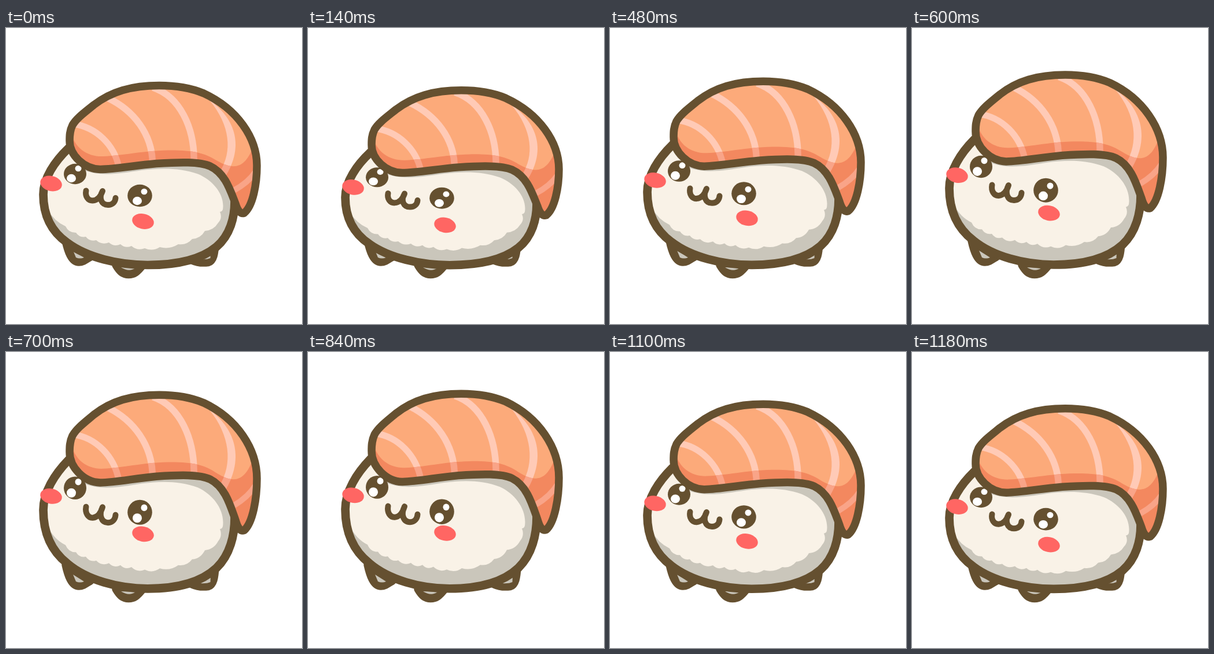
These frames come from a looping animation (512 by 512 pixels, 1200 ms). An HTML page with a canvas:

```html
<!DOCTYPE html>
<html lang="en">
<head>
<meta charset="utf-8">
<title>Breathing sushi</title>
<style>
  html, body { margin: 0; width: 100%; height: 100%; overflow: hidden; background: #fff; }
  canvas { display: block; width: 100vw; height: 100vh; object-fit: contain; }
</style>
</head>
<body>
<canvas id="stage" width="512" height="512"></canvas>
<script>
const ctx = document.getElementById('stage').getContext('2d');
const LOOP = 1200, STEP = 20;

const ink = '#655030', rice = '#f9f2e7', riceShade = '#cac6bb',
      fish = '#fcaa7a', fishShade = '#f3885f',
      fat = '#ffcab6', fatShade = '#f9a488', blush = '#ff6663';

const feet = [
  ['M103 368 C107 386 113 405 126 405 C133 405 138 401 146 396', 'M116 385 L121 397 Q128 400 135 397 Z'],
  ['M190 410 C197 422 203 426.500 212 426.500 C222 426.500 227 422 236 411', 'M199 414 L224 415 Q213 423 199 414 Z'],
  ['M322 402 C333 407 343 406.500 350 405.500 C359 403 361 390 362 372', 'M336 400 L354 387 L353.500 398 Q347 401 336 400 Z']
];

const body = 'M108 208 C84 231 64.500 260 64.500 288 C64.500 330 84 356 106 371.500 C140 397 195 410 245 410 ' +
  'C300 410 338 400 364 378.500 C388 358 395.500 327 395.500 300 C396 250 340 190 250 190 C190 190 130 190 108 208 Z';

const salmon = 'M412 320 C427 308 434 270 434 238 C434 190 400 140 342 113 C318 103 290 99.500 265 99.500 ' +
  'C217 99.500 182 110 152 133 C136 146 122 156 115 168 C110 178 110 187 110 195 ' +
  'C110 220 135 244 163 244.500 C190 244 220 238 260 234.500 C300 232 335 231 353 239 ' +
  'C379 251 388 281 397 304 C401 317 406 322 412 320 Z';

const fishDark = 'M112 178 C118 209 142 223 168 222 C200 221 235 212.500 280 211.500 C320 211 342 215 364 229 ' +
  'C395 247 413 242 427 207 L445 202 L445 330 L395 330 L340 260 L150 260 L100 230 Z';

const stripes = [
  ['M116 166 C156 171 187 202 195 240', 11],
  ['M176 121 C222 143 252 184 253.500 232', 11.500],
  ['M254 103 C300 118 327 172 325 234', 11.500],
  ['M394 281 C405 275 421 265 432 248', 10]
];
const wideStripe = 'M352 125 C386 148 418 195 380 256 L370 248 C392 214 388 168 352 125 Z';

const mouth = 'M138.500 281.500 C136.500 291 142 299 150 298.500 C158 298 164 291 167 282 ' +
  'C160 294 165 306 176.500 306 C184 306 189 301 189.500 294';

// Inward cusps of the scalloped rice edge
const cusps = [[73, 315], [103, 343], [121, 354], [138, 361], [156, 367], [178, 371], [198, 374], [217, 377],
  [240, 381], [266, 379], [298, 374], [322, 365], [344, 351], [367, 337], [370, 318], [375, 314]];

const scallops = cusps.slice(1).map(([x, y], i) => {
  const [px, py] = cusps[i];
  const dx = x - px, dy = y - py, k = Math.min(7, Math.hypot(dx, dy) / 3) / Math.hypot(dx, dy);
  return `Q${(px + x) / 2 - dy * k} ${(py + y) / 2 + dx * k} ${x} ${y}`;
}).join(' ');

const riceLight = 'M105 205 L60 270 L64 295 L73 315 ' + scallops +
  ' C379 289 359 264 332 252.500 C300 241.500 268 242 235 246 C200 251 165 258 135 246 Z';

const eyes = [
  [119.5, 252.5, 19.5, 17.7, [[113, 260, 8, 7.2], [125, 243, 5.5, 5.2]]],
  [231.5, 290, 21.3, 19.3, [[227, 299, 8, 7.2], [239, 283, 5.5, 5.2]]]
];

const warp = (data, f) =>
  new Path2D(data.replace(/(-?[\d.]+) (-?[\d.]+)/g, (_, x, y) => `${x} ${f(+y)}`));

function fill(path, color) {
  ctx.fillStyle = color;
  ctx.fill(path);
}

function stroke(path, color, width, cap = 'round') {
  ctx.strokeStyle = color;
  ctx.lineWidth = width;
  ctx.lineCap = cap;
  ctx.lineJoin = 'round';
  ctx.stroke(path);
}

function oval(x, y, rx, ry, color, turn = 0) {
  ctx.beginPath();
  ctx.ellipse(x, y, rx, ry, turn, 0, Math.PI * 2);
  ctx.fillStyle = color;
  ctx.fill();
}

function clipped(path, paint) {
  ctx.save();
  ctx.clip(path);
  paint();
  ctx.restore();
}

function draw(time) {
  const wave = Math.sin(2 * Math.PI * (time + 100) / LOOP) - 0.5;
  const lift = 18.5 * wave;
  // The body stretches more towards its top, the face evenly
  const bend = y => y + lift * (1 - Math.min(1, Math.max(0, (y - 93) / 322)) ** 1.75);
  const grow = 1 - lift / 214;
  const faceY = y => 398 + (y - 398) * grow;
  const shape = data => warp(data, bend);

  ctx.fillStyle = '#fff';
  ctx.fillRect(0, 0, 512, 512);

  for (const [line, inside] of feet) {
    const leg = new Path2D(line);
    fill(leg, ink);
    stroke(leg, ink, 13.5);
    fill(new Path2D(inside), riceShade);
  }

  const bodyPath = shape(body);
  fill(bodyPath, riceShade);
  clipped(bodyPath, () => fill(shape(riceLight), rice));
  stroke(bodyPath, ink, 14.7);

  for (const [x, y, rx, ry, lights] of eyes) {
    oval(x, faceY(y), rx, ry * grow, ink);
    for (const [lx, ly, lrx, lry] of lights) oval(lx, faceY(ly), lrx, lry * grow, '#fff');
  }
  stroke(warp(mouth, faceY), ink, 10);

  const fishPath = shape(salmon);
  const fatLines = color => {
    for (const [line, width] of stripes) stroke(shape(line), color, width, 'butt');
    fill(shape(wideStripe), color);
  };
  fill(fishPath, fish);
  clipped(fishPath, () => {
    fatLines(fat);
    const dark = shape(fishDark);
    fill(dark, fishShade);
    clipped(dark, () => fatLines(fatShade));
  });
  stroke(fishPath, ink, 13.5);

  for (const [x, y] of [[78, 269], [237, 334.5]]) {
    oval(x, y + 14.3 * wave, 19, 13, blush, 0.22);
  }
}

function tick() {
  draw(Math.floor(performance.now() % LOOP / STEP) * STEP);
  requestAnimationFrame(tick);
}
tick();
</script>
</body>
</html>
```
